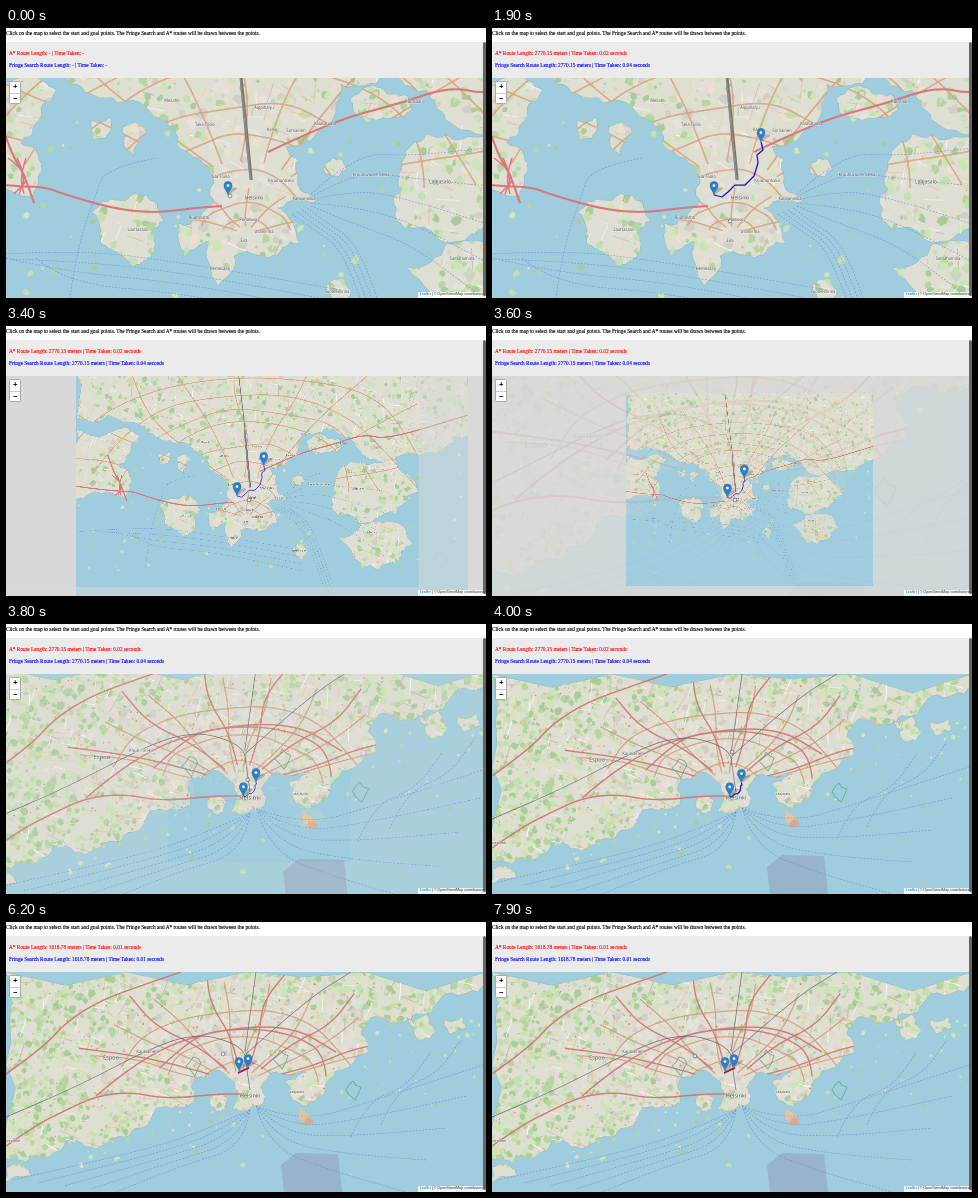
Recreate the animation shown at these times as an HTML page with a canvas. Size 480 by 270 pixels, loop 8 s.

```html
<!DOCTYPE html>
<html lang="en">
<head>
<meta charset="utf-8">
<title>Route search map</title>
<style>
html, body { margin: 0; width: 100%; height: 100%; overflow: hidden; background: #fff; }
#stage { position: absolute; left: 0; top: 0; width: 480px; height: 270px; overflow: hidden; font: 5.33px/6px "Liberation Serif", serif; }
#stage > * { position: absolute; white-space: nowrap; }
#stage > .text { -webkit-text-stroke: .12px; }
#panel { left: 0; top: 13.5px; width: 480px; height: 36.5px; background: #ebebeb; }
#map { left: 0; top: 50px; }
#zoom { left: 3.3px; top: 53.3px; width: 10px; height: 21px; background: #fff; border: .7px solid #aaa; border-radius: 1.5px; font: bold 7.5px/10.5px "Liberation Mono", monospace; text-align: center; }
#zoom b { display: block; height: 10.5px; }
#zoom b + b { border-top: .4px solid #ccc; }
#credit { left: 412px; top: 264px; width: 65px; height: 6px; padding-left: 1.7px; background: #ffffffcc; color: #333; font: 3.67px/5.5px "Liberation Sans", sans-serif; }
#credit span { color: #0078a8; }
#bar { left: 477px; top: 14px; width: 2.5px; height: 254px; border-radius: 2px; background: #666; }
</style>
</head>
<body>
<div id="stage">
  <div class="text" style="left:0;top:2px">Click on the map to select the start and goal points. The Fringe Search and A* routes will be drawn between the points.</div>
  <div id="panel"></div>
  <div class="text" id="astar" style="left:3px;top:22.4px;color:#f00"></div>
  <div class="text" id="fringe" style="left:3px;top:34.2px;color:#00f"></div>
  <canvas id="map" width="480" height="220"></canvas>
  <div id="zoom"><b>+</b><b>−</b></div>
  <div id="credit"><span>Leaflet</span> | © OpenStreetMap contributors</div>
  <div id="bar"></div>
</div>
<script>
const LOOP = 8000, PIVOT = [243, 174], OUT = 0.25;
const ZOOM_START = 3204, ZOOM_TIME = 735, ZOOM_END = ZOOM_START + ZOOM_TIME;
const WATER = '#a0cddd', MOTORWAY = '#e2727f', ORANGE = '#edb583', FERRY = '#6f8be0', RAIL = '#777';
const GREENS = ['#b5d6a0', '#c5dfb0', '#a9cd98', '#cbe6b2', '#d9e3c5'];
const GREYS = ['#dcd8d2', '#e7e3dc', '#d3cec8', '#eae0d2', '#e3dfdb'];
const STREETS = ['#fff', '#f8f3ea', '#c4bab0', '#efcf9f', '#e9bfa0'];
const $ = id => document.getElementById(id);
const ctx = $('map').getContext('2d');

let seed = 7;
function rand() {
  seed = (seed + 0x6D2B79F5) | 0;
  let v = Math.imul(seed ^ seed >>> 15, 1 | seed);
  v ^= v + Math.imul(v ^ v >>> 7, 61 | v);
  return ((v ^ v >>> 14) >>> 0) / 4294967296;
}
const between = (a, b) => a + (b - a) * rand();
const pick = list => list[Math.floor(rand() * list.length)];
const clamp = v => Math.max(0, Math.min(1, v));
const points = text => text.split(' ').map(p => p.split(',').map(Number));
const repeat = (n, fn) => { for (let i = 0; i < n; i++) fn(i); };

// Closed outline with fractal detail, like a coastline
function coast(text, depth = 3) {
  let pts = points(text);
  while (depth--) pts = pts.flatMap((p, i) => {
    const q = pts[(i + 1) % pts.length], dx = q[0] - p[0], dy = q[1] - p[1];
    const k = Math.hypot(dx, dy) > 120 ? 0 : between(-.2, .2);
    return [p, [(p[0] + q[0]) / 2 - dy * k, (p[1] + q[1]) / 2 + dx * k]];
  });
  const path = new Path2D();
  pts.forEach(p => path.lineTo(...p));
  path.closePath();
  return path;
}

function smooth(pts) {
  const path = new Path2D(), last = pts.length - 1;
  path.moveTo(...pts[0]);
  for (let i = 1; i < last; i++) {
    const [x, y] = pts[i], n = pts[i + 1];
    path.quadraticCurveTo(x, y, (x + n[0]) / 2, (y + n[1]) / 2);
  }
  path.lineTo(...pts[last]);
  return path;
}
const curve = (text, shift = 0) => smooth(points(text).map(([x, y]) => [x + shift, y - shift * .4]));

function stroke(g, path, color, width, dash = []) {
  g.strokeStyle = color;
  g.lineWidth = width;
  g.setLineDash(dash);
  g.lineJoin = 'round';
  g.stroke(path);
}
function road(g, path, color, width) {
  stroke(g, path, '#b9806a', width + .5);
  stroke(g, path, color, width);
}
const ferry = (g, path) => stroke(g, path, FERRY, .55, [1.8, 1.5]);

function blob(g, x, y, r, color) {
  const turn = rand() * 6;
  g.beginPath();
  repeat(6, i => {
    const a = turn + i * Math.PI / 3, d = r * between(.45, 1.1);
    g.lineTo(x + Math.cos(a) * d, y + Math.sin(a) * d);
  });
  g.fillStyle = color;
  g.fill();
}

// Arterials fanning north from a centre, crossed by ring roads
function network(g, [cx, cy], spokes, reach, rings, color, width) {
  const at = (a, r) => [cx + Math.cos(a) * r * 1.5, cy - Math.sin(a) * r];
  repeat(spokes, i => {
    const a = .35 + 2.45 * i / (spokes - 1);
    road(g, smooth([.15, .4, .7, 1].map(k => at(a + between(-.09, .09), reach * k))), color, width);
  });
  repeat(rings, i => {
    const r = reach * (i + 1) / (rings + 1), arc = [];
    for (let a = .1; a < 3.1; a += .4) arc.push(at(a, r * between(.92, 1.08)));
    road(g, smooth(arc), color, width);
  });
}

function streets(g, n, x0, y0, x1, y1) {
  repeat(n, () => {
    const x = between(x0, x1), y = between(y0, y1), len = between(4, 22);
    const a = pick([.25, 1.8]) + between(-.3, .3);
    stroke(g, smooth([[x, y], [x + Math.cos(a) * len, y + Math.sin(a) * len]]), pick(STREETS), between(.4, .9));
  });
}

function labels(g, text) {
  g.textAlign = 'center';
  g.textBaseline = 'middle';
  text.split('; ').forEach(item => {
    const [name, x, y, size = 4] = item.split('/');
    g.font = `${size}px "Noto Sans", sans-serif`;
    g.strokeStyle = '#ffffffb0';
    g.lineWidth = .8;
    g.setLineDash([]);
    g.strokeText(name, x, y);
    g.fillStyle = '#444';
    g.fillText(name, x, y);
  });
}

function layer(x, y, w, h, paint) {
  const img = document.createElement('canvas');
  img.width = w * 2;
  img.height = h * 2;
  const g = img.getContext('2d');
  g.scale(2, 2);
  g.translate(-x, -y);
  g.fillStyle = WATER;
  g.fillRect(x, y, w, h);
  paint(g);
  return { img, x, y, w, h };
}

// Fills the outlines with a patchwork; `green(x, y)` is the chance of parkland
function landMass(g, outlines, [x0, y0, x1, y1], size, green) {
  const land = new Path2D();
  outlines.forEach(t => land.addPath(coast(t)));
  g.fillStyle = '#dfded2';
  g.fill(land);
  stroke(g, land, '#86b4bd', .5);
  g.clip(land);
  repeat(3200, () => {
    const x = between(x0, x1), y = between(y0, y1);
    blob(g, x, y, between(1, size), pick(rand() < green(x, y) ? GREENS : GREYS));
  });
}

const city = layer(-60, -123, 687, 536, g => {
  repeat(110, () => blob(g, between(-60, 627), between(60, 300), between(1, 5), pick(GREENS)));
  g.save();
  landMass(g, [
    '-60,-123 627,-123 627,60 560,90 505,98 440,92 420,62 380,48 335,56 325,95 280,118 292,150 312,172 272,180 294,215 262,230 228,228 212,258 203,213 178,228 172,195 208,172 193,130 165,100 140,78 85,66 50,40 -60,30',
    '-60,50 20,48 50,62 30,95 15,115 36,140 28,168 -60,172',
    '85,92 105,90 100,110 88,112', '116,98 130,94 140,106 128,128 118,118',
    '86,185 112,172 130,165 150,175 158,192 145,205 146,226 128,238 112,225 95,215',
    '345,70 375,60 402,68 405,82 385,90 355,88', '320,135 335,131 341,140 332,149 320,146',
    '393,145 405,118 440,106 500,100 540,160 500,198 465,206 400,200 388,175',
    '402,240 440,216 490,212 530,250 500,285 440,290', '320,257 335,250 345,262 335,280'
  ], [-60, -123, 627, 300], 7, (x, y) => Math.hypot(x - 245, (y - 130) * .9) < 80 ? .22 : .68);
  streets(g, 900, -60, -123, 627, 290);
  network(g, [238, 172], 9, 260, 7, ORANGE, .8);
  network(g, [240, 205], 5, 45, 2, ORANGE, .7);
  g.restore();
  ['-60,150 0,158 40,159 57,166 109,181 150,185 188,180 216,178', '262,124 300,106 345,88 392,76 445,58 485,68 627,25', '-5,95 5,125 18,146 28,175']
    .forEach(t => road(g, curve(t), MOTORWAY, 1.5));
  repeat(3, i => stroke(g, curve(`${2 + i * 9},130 ${26 - i * 6},148 ${8 + i * 5},166`), MOTORWAY, 1.4));
  stroke(g, curve('215,-123 228,-20 236,50 241,100 246,152'), RAIL, 1.4);
  repeat(3, i => stroke(g, curve(`${234 + i},50 ${239 + i},105 ${244 + i},152`), RAIL, .8));
  repeat(4, i => ferry(g, curve('286,186 305,200 328,215 342,238 356,275 400,400', i * 5)));
  repeat(5, i => ferry(g, curve(`305,${166 + i * 3} 350,${125 + i * 18} 405,${128 + i * 22} 480,${120 + i * 38}`)));
  repeat(4, i => ferry(g, curve(`${-60 + i * 30},230 60,${220 + i * 12} 180,${235 + i * 10} 335,${262 + i * 12}`)));
  ferry(g, curve('150,130 100,140 90,165 70,225 60,300'));
  labels(g, 'Meilahti/166/73; Alppiharju/258/80; Taka-Töölö/199/97; Kallio/266/102; Sörnäinen/290/103; Kalasatama/319/96; Kulosaari/408/74; Etu-Töölö/215/149; Kruununhaka/275/153; Helsinki/248/170/5; Katajanokka/298/171; Ruoholahti/193/190; Punavuori/243/192; Ullanlinna/258/204; Eira/238/213; Hernesaari/214/241; Suomenlinna/331/264; Lauttasaari/132/202; Kruunuvuorenselkä/365/147; Laajasalo/434/154/5; Santahamina/456/231');
});

const region = layer(0, 50, 480, 220, g => {
  repeat(45, () => {
    blob(g, between(320, 480), between(90, 195), between(.7, 3.2), pick(GREENS));
    blob(g, between(60, 260), between(182, 245), between(.7, 3.2), pick(GREENS));
  });
  g.save();
  landMass(g, [
    '0,50 480,50 480,62 440,72 425,90 398,100 372,95 355,112 362,130 322,158 300,184 286,178 280,160 300,150 270,150 255,165 260,174 242,188 226,186 229,163 210,148 190,155 188,180 150,185 138,205 118,215 80,225 60,218 20,240 0,236',
    '203,178 211,172 221,176 219,187 210,189', '400,95 420,92 430,108 412,118', '438,98 455,95 460,106 445,112', '0,245 18,243 25,254 0,260'
  ], [0, 50, 480, 245], 5, (x, y) => clamp(Math.hypot((x - 225) / 150, (y - 130) / 75) * .9 - .2));
  streets(g, 380, 0, 50, 470, 225);
  network(g, [235, 165], 8, 105, 3, ORANGE, .5);
  repeat(210, () => blob(g, between(0, 400), between(54, 210), between(.6, 1.1), '#d58a45'));
  network(g, [238, 160], 6, 115, 1, MOTORWAY, .8);
  g.restore();
  blob(g, 297, 194, 9, '#e8c3a0');
  blob(g, 302, 199, 7, '#dfaa87');
  g.fillStyle = '#8f9bb780';
  g.fill(new Path2D('M275 243L290 231L332 232L336 270H278Z'));
  [[347, 168], [274, 137], [187, 144]].forEach(([x, y]) => {
    stroke(g, coast(`${x - 7},${y} ${x},${y - 9} ${x + 8},${y - 3} ${x + 2},${y + 10}`, 1), '#5fae8a', .8);
  });
  ['0,224 30,203 60,188 90,174 125,170 160,177 212,172 238,172', '0,152 38,125 60,100 95,78 140,62 175,50', '90,174 135,135 205,108 285,103 330,130']
    .forEach(t => road(g, curve(t), MOTORWAY, .9));
  ['244,168 240,142 239,130 225,120 195,112 155,121 70,165 0,195', '239,130 243,100 250,50', '240,132 300,78 345,50']
    .forEach(t => stroke(g, curve(t), '#6f6a78', .7));
  repeat(5, i => ferry(g, curve(`250,184 ${262 + i * 8},${225 - i * 6} ${330 + i * 10},${250 - i * 18} ${400 + i * 20},${270 - i * 32}`)));
  repeat(5, i => ferry(g, curve(`244,188 ${238 - i * 8},${225 - i * 5} ${180 - i * 8},${242 - i * 4} ${110 - i * 26},${270 - i * 3}`)));
  repeat(2, i => ferry(g, curve('345,215 360,180 400,165 425,130', i * 30)));
  labels(g, 'Espoo/105/136/5.5; Helsinki/244/174/5.5; Kauniainen/141/130; Laajasalo/291/170/3.3; Kivenlahti/6/219/3.6');
});

// Cursor stops: time, x, y
const STOPS = points('0,224,168 700,269,114 1000,269,114 1900,238,193 2700,243,174 3650,243,174 4000,240,128 4600,233,149 5300,242,146 6200,217,132 7300,192,147 7700,203,134 8000,203,134');
const FIRST_ROUTE = points('222,167 230,169 236,164 243,157 253,157 262,148 266,135 265,127 271,122 269,114');
const SECOND_ROUTE = points('232,151 238,148 243,146');

// cubic-bezier(0, 0, .25, 1)
function zoomEase(x) {
  let lo = 0, hi = 1;
  repeat(20, () => {
    const m = (lo + hi) / 2;
    if (.75 * m * m * (1 - m) + m ** 3 < x) lo = m; else hi = m;
  });
  return lo * lo * (3 - 2 * lo);
}

function drawLayer({ img, x, y, w, h }, scale, alpha) {
  ctx.globalAlpha = alpha;
  ctx.drawImage(img, PIVOT[0] + (x - PIVOT[0]) * scale, PIVOT[1] + (y - PIVOT[1]) * scale, w * scale, h * scale);
  ctx.globalAlpha = 1;
}

function route(pts, color, width) {
  const path = new Path2D();
  pts.forEach(p => path.lineTo(...p));
  stroke(ctx, path, color, width);
}

const PIN = new Path2D('M0 0C-1 -4 -4 -6 -4 -9.5A4 4 0 0 1 4 -9.5C4 -6 1 -4 0 0Z');
function pin([x, y]) {
  ctx.save();
  ctx.translate(x, y);
  ctx.fillStyle = '#0003';
  ctx.fill(new Path2D('M0 0L4 -7Q10 -9 9 -6Z'));
  ctx.fillStyle = '#2a81cb';
  ctx.fill(PIN);
  stroke(ctx, PIN, '#2368a4', .5);
  ctx.fillStyle = '#fff';
  ctx.beginPath();
  ctx.arc(0, -9.4, 1.4, 0, 7);
  ctx.fill();
  ctx.restore();
}

function cursor(t) {
  const i = STOPS.findIndex(s => s[0] > t), a = STOPS[i - 1], b = STOPS[i];
  const p = (t - a[0]) / (b[0] - a[0]), k = p * p * (3 - 2 * p);
  const dot = new Path2D();
  dot.arc(a[1] + (b[1] - a[1]) * k, a[2] + (b[2] - a[2]) * k, 1.9, 0, 7);
  ctx.fillStyle = '#ffffffb0';
  ctx.fill(dot);
  stroke(ctx, dot, '#444', .6);
}

function results(t) {
  const [length, astar, fringe] = t < 1000 ? [] : t < 5500 ? ['2770.15', '0.02', '0.04'] : ['1618.78', '0.01', '0.01'];
  const text = (name, time) => `${name} Route Length: ${length ? length + ' meters' : '-'} | Time Taken: ${time ? time + ' seconds' : '-'}`;
  $('astar').textContent = text('A*', astar);
  $('fringe').textContent = text('Fringe Search', fringe);
}

function draw(now) {
  const t = now % LOOP;
  const scale = 1 - (1 - OUT) * zoomEase(clamp((t - ZOOM_START) / ZOOM_TIME));
  const place = ([x, y]) => [PIVOT[0] + (x - PIVOT[0]) * scale, PIVOT[1] + (y - PIVOT[1]) * scale];
  ctx.setTransform(1, 0, 0, 1, 0, -50);
  ctx.fillStyle = '#d8d8d8';
  ctx.fillRect(0, 50, 480, 220);
  if (t < ZOOM_END) drawLayer(city, scale, 1);
  if (t > ZOOM_START && t < 3550) {
    // Edge tiles are still fading in
    const [x, y] = place([541, 327]), fade = .5 * (1 - clamp((t - 3400) / 150));
    ctx.fillStyle = `rgba(216,216,216,${fade})`;
    ctx.fillRect(x, 50, 480 - x, 220);
    ctx.fillRect(0, y, x, 270 - y);
  }
  const fadeIn = .15 * clamp((t - 3500) / 100) + .85 * clamp((t - 3600) / 250);
  if (fadeIn) drawLayer(region, scale / OUT, fadeIn);

  if (t < 4600) {
    const path = FIRST_ROUTE.map(place);
    if (t >= 1000) route(path, '#1c0cd0', t < ZOOM_END ? 1.25 * Math.max(scale, .6) : 1.25);
    pin(path[0]);
    if (t >= 800) pin(path[path.length - 1]);
  } else {
    if (t >= 5500) {
      route(SECOND_ROUTE, '#2a10a0', 1.5);
      route(SECOND_ROUTE, '#e01020', 1.2);
    }
    pin([233, 149]);
    if (t >= 5300) pin([242, 146]);
  }
  cursor(t);
  results(t);
  requestAnimationFrame(draw);
}
requestAnimationFrame(draw);
</script>
</body>
</html>
```
